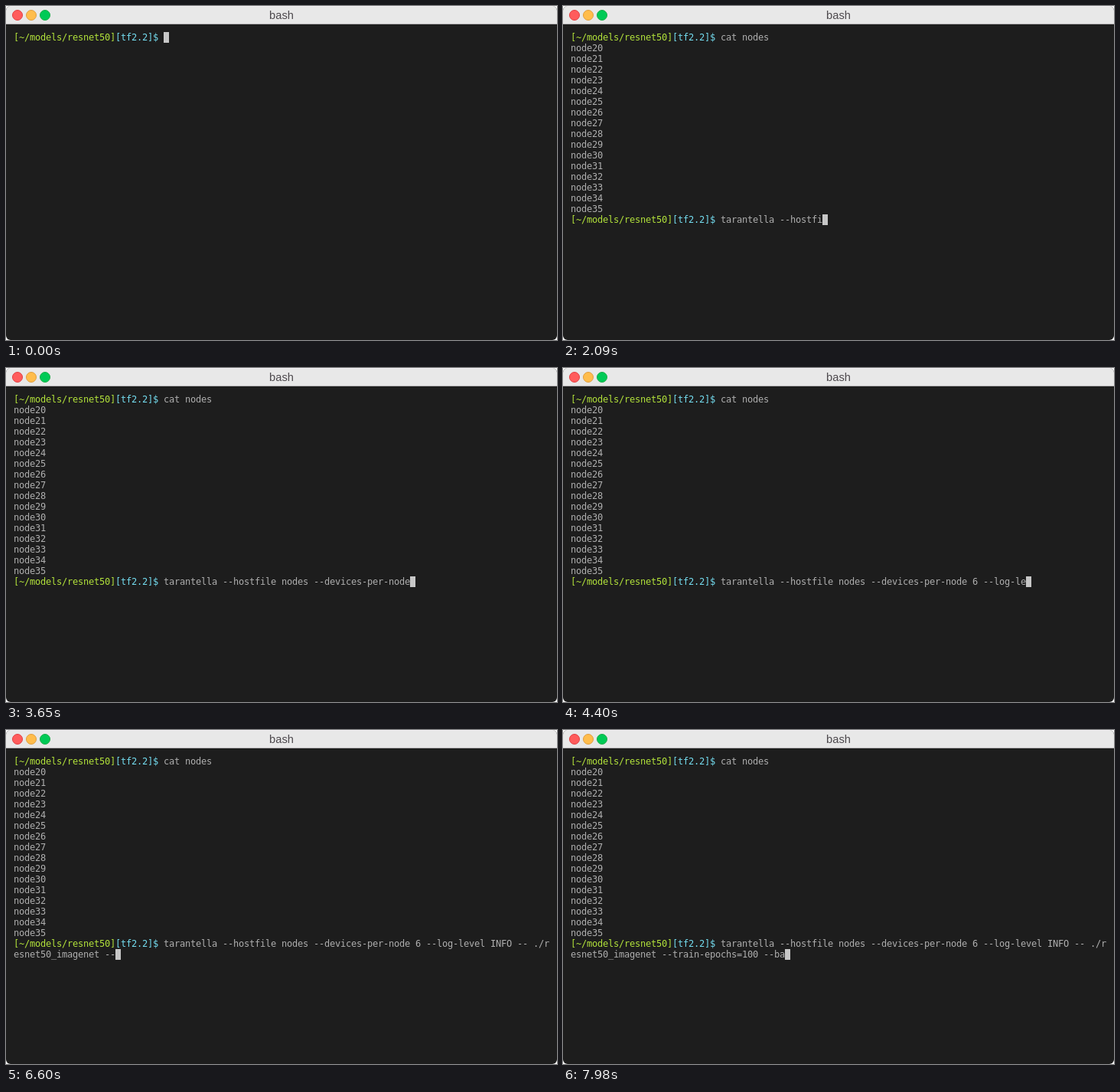
Write an HTML page with a canvas that moves like this. It is 720 px wide and 436 px high and loops after 8000 ms.

```html
<!DOCTYPE html>
<html lang="en">
<head>
<meta charset="utf-8">
<title>bash</title>
<style>
  html, body { margin: 0; width: 100%; height: 100%; overflow: hidden; background: #fff; }
  canvas { display: block; }
</style>
</head>
<body>
<canvas id="stage" width="720" height="436"></canvas>
<script>
const ctx = document.getElementById('stage').getContext('2d');
const LOOP = 8000, WIDTH = 720, HEIGHT = 436;
const COLS = 100, CELL_W = 7, CELL_H = 14, LEFT = 10, TOP = 34;
const GREY = '#afafaf', GREEN = '#b3e33b', CYAN = '#75dff2', CURSOR = '#c7c7c7';

// One entry per keystroke; "ntella " arrives at once by tab completion
const keys = [
  ...'cat nodes\ntara', 'ntella ',
  ...'--hostfile nodes --devices-per-node 6 --log-level INFO -- ',
  ...'./resnet50_imagenet --train-epochs=100 --ba'
];
const listing = Array.from({ length: 16 }, (_, i) => `node${20 + i}\n`).join('');

// [ms, keystrokes]: steady typing between these points, with two pauses
const pace = [
  [0, 0], [200, 1], [810, 10], [1380, 11], [2090, 23], [3650, 50],
  [5240, 75], [5760, 83], [6030, 84], [6600, 95], [7980, keys.length]
];

function keysAt(t) {
  const i = pace.findIndex(([end]) => t < end);
  if (i < 0) return keys.length;
  const [t0, n0] = pace[i - 1], [t1, n1] = pace[i];
  return Math.floor(n0 + (n1 - n0) * (t - t0) / (t1 - t0));
}

function drawButton(x, fill, edge) {
  ctx.beginPath();
  ctx.arc(x, 12, 6.5, 0, 2 * Math.PI);
  ctx.fillStyle = fill;
  ctx.fill();
  ctx.strokeStyle = edge;
  ctx.stroke();
}

function drawWindow() {
  const band = (y, height, color) => {
    ctx.fillStyle = color;
    ctx.fillRect(0, y, WIDTH, height);
  };
  ctx.clearRect(0, 0, WIDTH, HEIGHT);
  ctx.save();
  ctx.beginPath();
  ctx.roundRect(0, 0, WIDTH, HEIGHT, 6);
  ctx.clip();
  band(0, HEIGHT, '#1d1d1d');
  band(0, 24, '#e8e8e8');
  band(0, 1, '#f3f1f3');
  band(23, 1, '#b1aeb1');
  ctx.restore();

  drawButton(15, '#ff5c5c', '#e33e41');
  drawButton(33, '#ffbd4c', '#e09e3e');
  drawButton(51, '#00ca56', '#14ae46');

  ctx.font = '11pt "Liberation Sans", Arial, sans-serif';
  ctx.textAlign = 'center';
  ctx.fillStyle = '#4d494d';
  ctx.fillText('bash', WIDTH / 2, 17);
}

function drawTerminal(pressed) {
  let col = 0, row = 0;
  const print = (text, color) => {
    ctx.fillStyle = color;
    for (const ch of text) {
      if (ch !== '\n') ctx.fillText(ch, LEFT + col++ * CELL_W, TOP + row * CELL_H + 11);
      if (ch === '\n' || col === COLS) { col = 0; row++; }
    }
  };
  const prompt = () => {
    print('[~/models/resnet50]', GREEN);
    print('[tf2.2]$ ', CYAN);
  };

  ctx.font = '12px "DejaVu Sans Mono", monospace';
  ctx.textAlign = 'left';
  prompt();
  for (const key of keys.slice(0, pressed)) {
    print(key, GREY);
    if (key === '\n') {
      print(listing, GREY);
      prompt();
    }
  }
  ctx.fillStyle = CURSOR;
  ctx.fillRect(LEFT + col * CELL_W, TOP + row * CELL_H, CELL_W, CELL_H);
}

function frame() {
  drawWindow();
  drawTerminal(keysAt(performance.now() % LOOP));
  requestAnimationFrame(frame);
}
frame();
</script>
</body>
</html>
```
